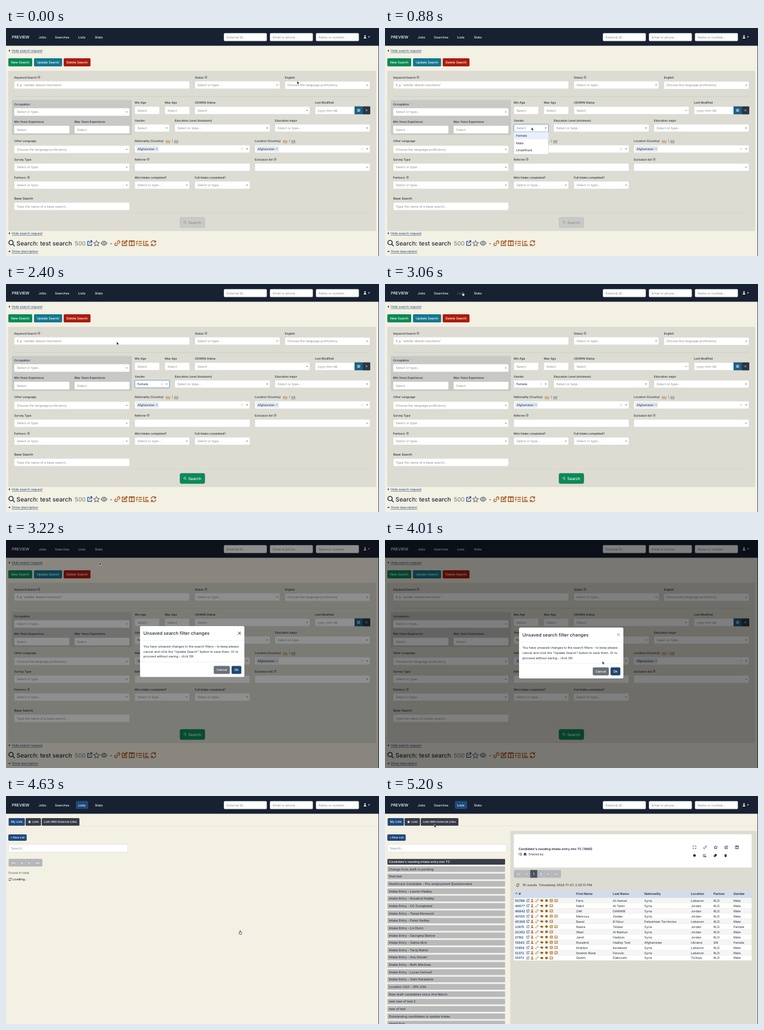
Recreate the animation shown at these times as an HTML page. Size 640 px wide and 392 px high, loop 5.31 s.

```html
<!DOCTYPE html>
<html lang="en">
<head>
<meta charset="utf-8">
<title>Search filters</title>
<style>
html, body { margin: 0; width: 100%; height: 100%; overflow: hidden; background: #f3f0e4; }
svg { display: block; width: 100%; height: 100%; }
text { font-family: Inter, Roboto, sans-serif; text-rendering: geometricPrecision; white-space: pre; }
</style>
</head>
<body>
<svg id="stage" viewBox="0 0 640 392"></svg>
<script>
const INK = '#202b3a', GREY = '#878b90', NAVY = '#1f4a7d', RUST = '#a4561a', OCHRE = '#a0640f',
  GREEN = '#0a8a58', PANEL = '#dddcd2';

// Icon outlines on a 10 unit grid around the origin
const ICONS = {
  ext: 'M0-3.5H-3.5V4H4V.5M1.5-4.5H4.5V-1.5M4.5-4.5L-.5.5',
  star: 'M0-4.5L1.4-1.5 4.7-1.1 2.3 1.2 2.9 4.5 0 2.9-2.9 4.5-2.3 1.2-4.7-1.1-1.4-1.5Z',
  eye: 'M-5 0Q0-7 5 0Q0 7-5 0ZM-1.6 0a1.6 1.6 0 1 0 3.2 0a1.6 1.6 0 1 0-3.2 0',
  link: 'M-1 1L1.2-1M-.5-2.2L1.2-3.8A2 2 0 0 1 4-1L2.4.7M.5 2.2L-1.2 3.8A2 2 0 0 1-4 1L-2.4-.7',
  edit: 'M0-3.5H-4V4H3.5V.5M-1 1L-.5-1 3.5-4.8 4.8-3.5 1 .5Z',
  cols: 'M-4.3-4H4.3V4H-4.3ZM0-4V4M-4.3-3.2H4.3',
  tasks: 'M-5-3.2l1 1 1.6-2M-5 .3l1 1 1.6-2M-4.3 3.6h1M-1-3H5M-1 .4H5M-1 3.6H5',
  chart: 'M-4.5-4.5V4.2H4.8M-2-3H3M-2-.3H1M-2 2.2H4',
  sync: 'M-4-.5A4 4 0 0 1 3.2-2.6M4 .5A4 4 0 0 1-3.2 2.6M3.6-4.8V-2H1M-3.6 4.8V2H-1',
  expand: 'M-4-1.5V-4H-1.5M1.5-4H4V-1.5M4 1.5V4H1.5M-1.5 4H-4V1.5',
  find: 'M-4.4-1a3.4 3.4 0 1 0 6.8 0a3.4 3.4 0 1 0-6.8 0M1.6 1.6L4.6 4.6',
  person: 'M-2.2-2.4a2.2 2.2 0 1 0 4.4 0a2.2 2.2 0 1 0-4.4 0M-4 4.5Q-4 .8 0 .8T4 4.5Z',
  dot: 'M-4 0a4 4 0 1 0 8 0a4 4 0 1 0-8 0',
  hands: 'M-4.5-2L0-3 4.5-2V2L1 4-2 2.5-4.5 1Z',
  card: 'M-4.5-3.5H4.5V3.5H-4.5ZM-3 1.5H-.5M-2.6-1h1.2M1.2-1H3M1.2 1H3',
  sheet: 'M-4-3.5H4V4H-4ZM-4-1.2H4M-2 1.5H2',
  copy: 'M-1.5-4.5H4.5V1.5H-1.5ZM-4.5-1.5H-2.3V2.3H1.5V4.5H-4.5Z',
  trash: 'M-4-4H4V-2.6H-4ZM-3.3-1.8H3.3L2.7 4.5H-2.7Z',
  house: 'M-3.8 4.5V-2L0-4.5 3.8-2V4.5H1V1H-1V4.5Z'
};
const SOLID = ['person', 'dot', 'hands', 'copy', 'trash', 'house'];

const rect = (x1, y1, x2, y2, fill, r = 0, more = '') =>
  `<rect x="${x1}" y="${y1}" width="${x2 - x1}" height="${y2 - y1}" rx="${r}" fill="${fill}" ${more}/>`;
const text = (x, y, s, size = 5.5, fill = INK, weight = 400, more = '') =>
  `<text x="${x}" y="${y}" font-size="${size}" fill="${fill}" font-weight="${weight}" ${more}>${s}</text>`;
const mid = (x, y, s, size, fill, weight) => text(x, y, s, size, fill, weight, 'text-anchor="middle"');
const line = (x1, y1, x2, y2, c, w = .5) => `<path d="M${x1} ${y1}L${x2} ${y2}" stroke="${c}" stroke-width="${w}"/>`;
const group = (id, ...parts) => `<g id="${id}">${parts.join('')}</g>`;
const icon = (name, x, y, size, c, solid = SOLID.includes(name)) =>
  `<path transform="translate(${x} ${y}) scale(${size / 10})" d="${ICONS[name]}" ` +
  (solid ? `fill="${c}"/>` : `fill="none" stroke="${c}" stroke-width="1.3"/>`);
const caret = (x, y, c = '#777') => `<path d="M${x - 1.6} ${y - .8}h3.2l-1.6 1.9z" fill="${c}"/>`;
const cross = (x, y, r, c, w) => `<path d="M${x - r} ${y - r}l${2 * r} ${2 * r}m0 ${-2 * r}l${-2 * r} ${2 * r}" stroke="${c}" stroke-width="${w}"/>`;
const button = (x1, y1, x2, y2, s, fill, size = 5.4) =>
  rect(x1, y1, x2, y2, fill, 1.8) + mid((x1 + x2) / 2, (y1 + y2) / 2 + size * .36, s, size, '#fff', 500);

const label = (x, y, s, help) => text(x, y, s, 4.95, INK, 500) + (help
  ? `<circle cx="${help}" cy="${y - 1.8}" r="1.9" fill="none" stroke="${INK}" stroke-width=".5"/>` + mid(help, y - .6, '?', 3.2, INK, 600) : '');
const field = (x1, x2, y, s = '', arrow) =>
  rect(x1, y, x2, y + 13.2, '#fff', 1.5, 'stroke="#cfd0cd" stroke-width=".5"') +
  text(x1 + 4.5, y + 8.6, s, 5.5, GREY) + (arrow ? caret(x2 - 4.8, y + 6.7) : '');
const select = (x1, x2, y, s = 'Select or type...') => field(x1, x2, y, s, true);
const country = (x, w) => select(x, x + w, 201.2, '') +
  rect(x + 2.5, 203, x + 41, 212.5, '#e1ebf5', 1) + text(x + 4.7, 209.8, 'Afghanistan', 5.2) +
  cross(x + 38, 207.8, .9, INK, .5) + cross(x + w - 13.5, 207.8, 1, '#888', .5);
const anyNot = x => text(x, 196, 'any', 4.6, RUST, 500, 'text-decoration="underline"') +
  text(x + 10.5, 196, '|', 4.6) + text(x + 14.5, 196, 'not', 4.6, INK, 400, 'text-decoration="underline"');
const toggle = (y, s, up) => `<path d="${up ? `M4 ${y - 1}h4l-2-2.2z` : `M5 ${y - 4}v4l2.2-2z`}" fill="${INK}"/>` +
  text(10, y, s, 5.5, NAVY, 400, 'text-decoration="underline"');
const searchText = c => icon('find', 307.3, 334.2, 5, c) + text(312.8, 336.6, 'Search', 6.6, c, 500);

const nav = group('nav',
  rect(0, 0, 640, 30.5, '#172131'),
  text(10, 18, 'PREVIEW', 6.7, '#fff', 500),
  `<g id="active">${rect(120, 8.5, 141, 22.2, NAVY, 2)}</g>`,
  ['Jobs', 'Searches', 'Lists', 'Stats'].map((s, i) =>
    text([56, 84, 124, 152.5][i], 17.5, s, 5.5, '#f4f5f7', 500, `id="${s}"`)).join(''),
  ['External ID...', 'Email or phone...', 'Name or number...'].map((s, i) =>
    field(374 + 79 * i, 447.3 + 79 * i, 9, s)).join(''),
  icon('person', 616, 15.3, 6, '#fff'), caret(622.8, 15.3, '#fff'));

const search = group('search',
  toggle(41, 'Hide search request'),
  button(4, 52, 45, 66, 'New Search', GREEN),
  button(48, 52, 96.3, 66, 'Update Search', '#157890'),
  button(99, 52, 145, 66, 'Delete Search', '#ad1c0c'),
  rect(4.3, 74, 634.5, 348.5, PANEL, 1.5, 'stroke="#d0cfc5" stroke-width=".5"'),
  label(14.3, 86.5, 'Keyword Search', 56.5), field(14, 315, 91.3, "E.g. 'welder diesel+mechanic'"),
  label(324, 86.5, 'Status', 343), select(324, 470, 91.3),
  label(478.5, 86.5, 'English'), select(478.5, 624.5, 91.8, 'Choose the language proficiency'),
  line(14, 117.6, 625, 117.6, '#c4c3bb'),
  rect(10, 123.7, 216, 184, '#c8c8c5', 1.5),
  label(14, 132.6, 'Occupation'), select(14, 212, 137.8),
  label(14, 162.6, 'Min Years Experience'), field(14, 109, 168, 'Select'),
  label(117.5, 162.6, 'Max Years Experience'), field(117.5, 212, 168, 'Select'),
  label(221, 130.2, 'Min Age'), field(221, 263.5, 135, 'Select'),
  label(272.5, 130.2, 'Max Age'), field(272.5, 315, 135, 'Select'),
  label(324, 130.2, 'ODWRN Status'), select(324, 521.5, 135, 'Select'),
  label(530.3, 130.2, 'Last Modified'), field(530.3, 600, 135, 'yyyy-mm-dd'),
  rect(598, 134.7, 612, 148.4, '#1f5f86'), rect(612, 134.7, 625, 148.4, '#2b3645', 1),
  icon('sheet', 605, 141.5, 5, '#fff'), cross(618.5, 141.5, 1.3, '#fff', .7),
  label(221, 160.6, 'Gender'), select(221, 280.5, 165.4, ''),
  text(225.5, 174, 'Select', 5.5, GREY, 400, 'id="empty"'),
  group('female', text(225.3, 174, 'Female'), cross(267.5, 172, 1, '#888', .5)),
  label(289.5, 160.6, 'Education Level (minimum)'), select(289.5, 453, 165.4),
  label(461.5, 160.6, 'Education major'), select(461.5, 624.5, 165.4),
  label(14, 196, 'Other Language'), select(14, 212, 202, 'Choose the language proficiency'),
  label(221, 196, 'Nationality (Country)'), anyNot(274), country(221, 197.5),
  label(427, 196, 'Location (Country)'), anyNot(475), country(427, 197.5),
  label(14, 227.5, 'Survey Type'), select(14, 212, 232.8),
  label(221, 227.5, 'Referrer', 243.8), field(221, 418.5, 232.8),
  label(427, 227.5, 'Exclusion list', 461.7), select(427, 624.5, 232.8, ''),
  label(14, 258.6, 'Partners', 38.5), select(14, 212, 263.5),
  label(221, 258.6, 'Mini Intake completed?'), select(221, 315, 263.5),
  label(324, 258.6, 'Full Intake completed?'), select(324, 418.5, 263.5),
  text(14.3, 295.2, 'Base Search', 5.4, INK, 500), field(14, 212, 300, 'Type the name of a base search...'),
  line(14, 317.6, 625, 317.6, '#cfcec5'),
  rect(298.7, 325.7, 341, 343, '#c9c9c6', 2.2, 'stroke="#b2b4b2" stroke-width=".6"'), searchText('#8c9196'),
  group('go', rect(298.7, 325.7, 341, 343, GREEN, 2.2, 'stroke="#0b6f49" stroke-width=".6"'), searchText('#fff')),
  toggle(355, 'Hide search request'),
  icon('find', 9.8, 370, 11, INK), text(18, 373.8, 'Search: test search', 10.3, INK, 500),
  text(118, 373.8, '500', 10, '#74777a'), icon('ext', 143.3, 370, 9, NAVY),
  icon('star', 155.3, 370, 10, '#7d8083'), icon('eye', 168.3, 370, 10, '#7d8083'),
  text(178, 373.5, '-', 10),
  ['link', 'edit', 'cols', 'tasks', 'chart', 'sync'].map((n, i) => icon(n, 191 + 12.4 * i, 370, 10, RUST)).join(''),
  toggle(386, 'Show description', true),
  group('focus', rect(221, 165.4, 280.5, 178.6, 'none', 1.5, 'stroke="#6f9fd8" stroke-width="1"')),
  group('menu', rect(221, 178.8, 280.5, 217, '#fff', 1, 'stroke="#c4c6c8" stroke-width=".5"'),
    rect(221.3, 179.1, 280.2, 191.5, '#e8f1fb'),
    ['Female', 'Male', 'Undefined'].map((s, i) => text(225, 187 + 12.6 * i, s)).join('')));

const pages = (x, y, cuts, marks, on) => rect(x, y, x + cuts[cuts.length - 1], y + 13.3, '#b4b7ba', 1.8) + marks.map((s, i) => {
  const a = x + (i ? cuts[i - 1] : 0), b = x + cuts[i];
  return (i === on ? rect(a, y, b, y + 13.3, '#4b535d') : '') + (i ? line(a, y, a, y + 13.3, '#c8cacb', .4) : '') +
    mid((a + b) / 2, y + 8.7, s, 5.5, i === on || s < 'a' || on === undefined ? '#fff' : '#e6e7e8', 500);
}).join('');

const lists = group('lists',
  line(4, 51.5, 638, 51.5, '#dfddd3'),
  rect(4.5, 38, 32.3, 51, NAVY, 1.5), rect(33.5, 38, 60, 51, '#383b48', 1.5), rect(61.3, 38, 126, 51, '#383b48', 1.5),
  text(8.8, 46.2, 'My Lists', 4.95, '#fff', 500), icon('star', 40.4, 44.4, 5.4, '#fff', true),
  text(45.2, 46.2, 'Lists', 4.95, '#fff', 500), text(65.2, 46.2, 'Lists With External Links', 4.85, '#fff', 500),
  button(4, 66, 35.5, 77, '+ New List', NAVY, 4.8),
  field(4.3, 208.7, 83.2, 'Search...'),
  group('loading', pages(4.4, 108, [16.5, 29, 41.5, 58], ['««', '«', '»', '»»']),
    text(4.2, 133.7, 'Found in total', 5.5, '#555a60'),
    group('spin', icon('sync', 0, 0, 5.2, INK)), text(11.3, 145.4, 'Loading...', 5.4, INK, 500)));

const entry = s => 'Intake Entry - ' + s;
const titles = ["Candidate's needing intake entry into TC", 'Change from draft to pending', 'final test',
  'Healthcare Candidate - Pre-employment Questionnaire',
  ...['Lauren Hadley', 'Rosalind Hadley', 'CC Completed', 'Tessa Norwood', 'Peter Hadley', 'Liv Dunn', 'Georgina Barlow',
    'Salma Idrin', 'Tariq Wahdi', 'Anu Desani', 'Beth Marlowe', 'Lucas Verhoef', 'Selin Karadeniz'].map(entry),
  'Location USA - SPA USA', 'New draft candidates since 2nd March', 'new new sf test 2', 'new of test',
  'Outstanding candidates to update intake', 'saved bug'];
const side = group('side', titles.map((s, i) => {
  const y = 108.3 + 12.65 * i;
  return rect(4.2, y, 206, y + 9.6, i ? '#b7b9bb' : '#393d47', 1) + text(6.5, y + 6.7, s, i ? 5.5 : 5.4, i ? INK : '#fff', i ? 400 : 500);
}).join(''));

const COLS = [328, 391, 445, 525, 563.5, 598];
const people = `50788|Faris|Al-hamwi|Syria|Lebanon||Male|6
46677|Nabil|Al Tamir|Syria|Jordan||Male|5
46842|ZAK|DARWIB|Syria|Jordan||Male|5
45555|Mahrous|Zaidan|Syria|Jordan||Male|6
45306|Basel|El Nour|Palestinian Territories|Lebanon||Male|5
23615|Rasha|Tellawi|Syria|Jordan||Female|6
22302|Wael|Al Rashun|Syria|Jordan||Male|5
21192|Jamil|Haddun|Syria|Jordan||Male|6
13043|Rosalind|Hadley Test|Afghanistan|Ukraine|GN|Female|6
12808|khaldun|barakeed|Syria|Lebanon||Male|6
12372|Ibrahim Nizar|Farouki|Syria|Lebanon||Male|6
12072|Qasim|Daboushi|Syria|Türkiye||Male|5`.split('\n').map(r => r.split('|'));
const rowIcons = ['person', 'link', 'hands', 'dot', 'sheet', 'card'];
const row = ([id, ...cells], i) => {
  const y = 179.7 + 8.98 * i, count = +cells.pop();
  const kinds = rowIcons.filter((n, k) => count === 6 || k !== 4);
  return rect(221, y - 4.5, 629, y + 4.4, i % 2 ? '#fff' : '#f5f5f4') + line(221, y + 4.4, 629, y + 4.4, '#dcdddd', .4) +
    text(223, y + 2, id, 5.4, NAVY, 600) + icon('ext', 245, y, 5, NAVY) +
    kinds.map((n, k) => icon(n, 252.5 + 8.2 * k, y, 5.6, OCHRE)).join('') +
    cells.map((s, k) => text(COLS[k], y + 2, s || 'KLD', 5.4)).join('');
};
const detail = group('detail',
  rect(215, 60, 638, 392, PANEL),
  rect(221, 65.7, 629, 123, '#fff', 1.5),
  text(229.3, 92.7, titles[0] + ' (1880)', 5.5, INK, 600),
  icon('tasks', 232, 100, 5.5, INK), icon('house', 240.3, 100, 5.5, INK), text(246.3, 102, 'Shared by:', 5.3),
  ['expand', 'link', 'star', 'edit', 'cols'].map((n, i) => icon(n, 531 + 18.2 * i, 88.3, 6, INK)).join(''),
  ['dot', 'chart', 'copy', 'trash'].map((n, i) => icon(n, 531 + 17.8 * i, 102.3, 5.6, INK)).join(''),
  pages(221, 127.2, [16, 28, 40.5, 52.5, 65, 81], ['««', '«', '1', '2', '»', '»»'], 2),
  icon('sync', 227.8, 153.3, 5.4, INK), text(236, 155.2, '16 results. Timestamp 2024-11-07, 2:20:51 PM'),
  rect(221, 161.6, 629, 175, '#d2dcea'),
  `<path d="M223.5 168.6l2-2.2 2 2.2" fill="none" stroke="${INK}" stroke-width=".8"/>`, text(229.6, 169.7, '#', 5.5, INK, 600),
  ['First Name', 'Last Name', 'Nationality', 'Location', 'Partner', 'Gender'].map((s, i) => text(COLS[i], 169.7, s, 5.4, INK, 600)).join(''),
  people.map(row).join(''));

const modal = group('modal',
  rect(230, 150.5, 409, 238, '#fff', 2.2),
  text(235.8, 165.6, 'Unsaved search filter changes', 7.8, INK, 500),
  group('close', cross(400.6, 162.7, 2.5, '#111', .9)),
  line(230, 175.3, 409, 175.3, '#dfe1e3'), line(230, 212.3, 409, 212.3, '#dfe1e3'),
  ['You have unsaved changes to the search filters - to keep please',
    'cancel and click the "Update Search" button to save them. Or to',
    'proceed without saving - click OK.'].map((s, i) => text(235.8, 187.2 + 8.8 * i, s, 5.4)).join(''),
  button(356.5, 219, 384, 232.7, 'Cancel', '#6b7078'), button(387, 219, 403.8, 232.7, 'Ok', '#214870'));

const cursor = group('cursor',
  group('arrow', '<path d="M0 0V5.6L1.3 4.5 2.2 6.5 3.1 6.1 2.2 4.2H4Z" fill="#111" stroke="#fff" stroke-width=".5"/>'),
  group('hand', '<path d="M-.8-2.8q.7-.7 1.2 0V-.5L2.5 0V2L1.8 3.4H-1L-2.4.7-1.7.2-.8 1Z" fill="#fff" stroke="#222" stroke-width=".7"/>'));

stage.innerHTML = nav + search + lists + side + detail + line(639.6, 0, 639.6, 392, '#172131', .9) +
  group('shade', rect(0, 0, 640, 392, '#000')) + modal + cursor;

const LOOP = 5310;
// Runs of evenly spaced picture changes: first, last, count
const ticks = [[0, 0, 1], [120, 600, 6], [720, 880, 2], [1060, 1320, 5], [1470, 1470, 1], [1610, 1710, 3],
  [2000, 2510, 8], [2630, 2810, 3], [2960, 3060, 2], [3110, 3110, 1], [3220, 3320, 2], [3400, 3700, 4],
  [3850, 4130, 4], [4270, 4430, 3], [4530, 4630, 2], [4710, 4710, 1], [4820, 5200, 5]]
  .flatMap(([a, b, n]) => Array.from({ length: n }, (_, i) => n > 1 ? a + (b - a) * i / (n - 1) : a));
// Pointer stops: time, x, y
const path = [[0, 499.5, 91], [600, 252, 170], [1060, 251, 171], [1470, 248.5, 185], [1750, 248.5, 185],
  [2960, 134, 17], [3060, 134, 17], [3220, 160.3, 38], [4130, 399, 229], [4270, 402, 234.5], [4710, 402, 234.5],
  [5200, 84.3, 48.5], [LOOP, 84.3, 48.5]];

const el = id => document.getElementById(id);
const show = (id, on) => el(id).setAttribute('display', on ? 'inline' : 'none');
const fade = (id, v) => el(id).setAttribute('opacity', v);
const part = (t, a, d) => Math.min(1, Math.max(0, (t - a) / d));

function pointer(t) {
  const i = path.findIndex(p => p[0] > t), [t0, x0, y0] = path[i - 1], [t1, x1, y1] = path[i];
  const p = part(t, t0, t1 - t0), k = p * p * (3 - 2 * p);
  return `translate(${x0 + (x1 - x0) * k} ${y0 + (y1 - y0) * k})`;
}

function draw(now) {
  const clock = now % LOOP, t = ticks.filter(v => v <= clock).pop();
  const listed = t >= 4430, picked = t >= 1610;
  show('search', !listed);
  show('lists', listed);
  show('loading', t < 4820);
  show('side', t >= 4820);
  show('detail', t >= 4900);
  show('active', t >= 4530);
  el('Lists').setAttribute('fill', t >= 2960 && t < 3110 ? '#5d6a80' : '#f4f5f7');
  el('spin').setAttribute('transform', `translate(7 143.4) rotate(${(t - 4630) * .36})`);

  show('focus', t >= 720 && t < 2960);
  show('menu', t >= 720 && !picked);
  show('empty', !picked);
  show('female', picked);
  fade('go', part(t, 1540, 200));

  const enter = part(t, 3060, 300), leave = part(t, 4415, 150);
  fade('shade', .5 * part(t, 3060, 180) * (1 - leave));
  fade('modal', part(t, 3060, 150) * (1 - leave));
  fade('close', t < 3320 ? 1 : .5);
  el('modal').setAttribute('transform', `translate(0 ${-24 * ((1 - enter) ** 3 + leave ** 2)})`);

  const hand = (t >= 2960 && t < 3110) || (t >= 4130 && t < 4820);
  show('hand', hand);
  show('arrow', !hand);
  el('cursor').setAttribute('transform', pointer(t));
}

const start = performance.now();
function tick() {
  draw(performance.now() - start);
  requestAnimationFrame(tick);
}
tick();
</script>
</body>
</html>
```
